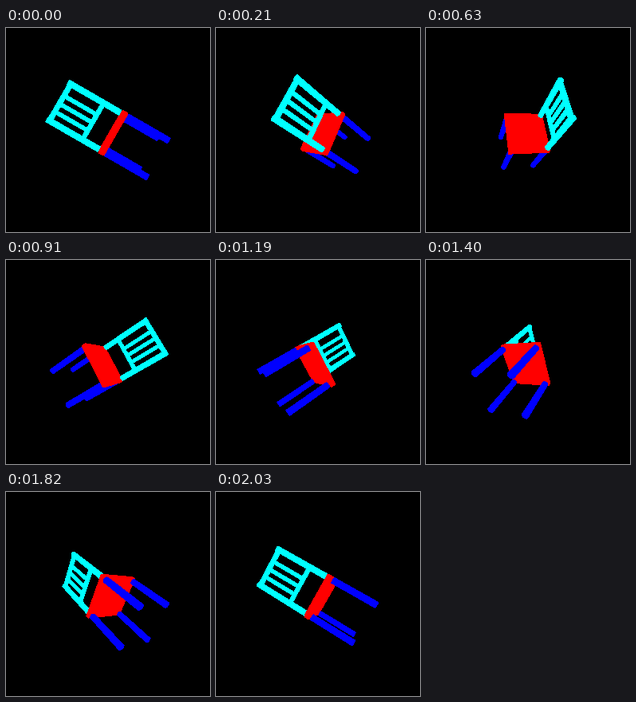
An HTML page with a canvas for the animation above (2100 ms loop, 256 by 256 pixels).

```html
<!DOCTYPE html>
<html lang="en">
<head>
<meta charset="utf-8">
<title>Turning chair</title>
<style>
  html, body { margin: 0; width: 100%; height: 100%; overflow: hidden; background: #000; }
  canvas { display: block; width: 100vw; height: 100vh; image-rendering: pixelated; }
</style>
</head>
<body>
<canvas id="stage" width="256" height="256"></canvas>
<script>
const SIZE = 256, MID = SIZE / 2;
const STEPS = 30, STEP_MS = 70;
const EYE = 240;               // camera distance
const TILT = Math.PI / 3;      // chair leans 60 degrees from the turning axis
const SIDES = 14;

const pack = (r, g, b) => (255 << 24 | b << 16 | g << 8 | r) >>> 0;
const BLACK = pack(0, 0, 0), RED = pack(255, 0, 0);
const BLUE = pack(0, 0, 255), CYAN = pack(0, 255, 255);

const ctx = document.getElementById('stage').getContext('2d');
const image = ctx.createImageData(SIZE, SIZE);
const pixels = new Uint32Array(image.data.buffer);
const depth = new Float32Array(SIZE * SIZE);

// Chair space: w across, u up, d towards the backrest.
const faces = [];

function prism(color, a, b) {
  faces.push({ color, points: a }, { color, points: b });
  a.forEach((p, i) => {
    const j = (i + 1) % a.length;
    faces.push({ color, points: [p, a[j], b[j], b[i]] });
  });
}

const ring = place => Array.from({ length: SIDES }, (_, i) => {
  const t = 2 * Math.PI * i / SIDES;
  return place(Math.cos(t), Math.sin(t));
});

function upright(color, w, d, u0, u1, r) {
  const end = u => ring((c, s) => [w + r * c, u, d + r * s]);
  prism(color, end(u0), end(u1));
}

function crossbar(color, u, d, half, r) {
  const end = w => ring((c, s) => [w, u + r * c, d + r * s]);
  prism(color, end(-half), end(half));
}

const HALF_W = 24.1, HALF_D = 22.4, TOP = 65.8;
const SEAT_TOP = -2.6, SEAT_BOTTOM = -10.9, BEVEL = 1.5, RAIL = 19.6;

// Seat slab with bevelled edges.
function seatOutline(u, inset) {
  const w = 28 - inset, d = 26.2 - inset;
  return [[-w, u, -d], [w, u, -d], [w, u, d], [-w, u, d]];
}
const layers = [
  seatOutline(SEAT_TOP, BEVEL), seatOutline(SEAT_TOP - BEVEL, 0),
  seatOutline(SEAT_BOTTOM + BEVEL, 0), seatOutline(SEAT_BOTTOM, BEVEL)
];
for (let i = 1; i < layers.length; i++) prism(RED, layers[i - 1], layers[i]);

for (const side of [-1, 1]) {
  const w = side * HALF_W;
  upright(CYAN, w, HALF_D, SEAT_TOP, TOP, 3.7);
  upright(BLUE, w, HALF_D, SEAT_BOTTOM, -TOP, 3.9);
  upright(BLUE, w, -HALF_D, SEAT_BOTTOM, -TOP, 3.9);
}
crossbar(CYAN, TOP - 3, HALF_D, HALF_W, 3.2);
crossbar(CYAN, RAIL, HALF_D, HALF_W, 2.9);
for (const k of [-1, 0, 1]) {
  upright(CYAN, HALF_W * (0.43 * k - 0.07), HALF_D, RAIL, TOP - 3, 2.6);
}

// Returns screen x, y and the perspective scale, which grows towards the viewer.
function project([w, u, d], angle) {
  const x = w * Math.cos(TILT) - u * Math.sin(TILT);
  const y = -w * Math.sin(TILT) - u * Math.cos(TILT);
  const c = Math.cos(angle), s = Math.sin(angle);
  const scale = EYE / (EYE - (d * c - x * s));
  return [MID + (x * c + d * s) * scale, MID + y * scale, scale];
}

const cross = (a, b, x, y) => (b[0] - a[0]) * (y - a[1]) - (b[1] - a[1]) * (x - a[0]);

function triangle(a, b, c, color) {
  const area = cross(a, b, c[0], c[1]);
  if (Math.abs(area) < 1e-6) return;
  const range = i => [
    Math.max(0, Math.floor(Math.min(a[i], b[i], c[i]))),
    Math.min(SIZE - 1, Math.ceil(Math.max(a[i], b[i], c[i])))
  ];
  const [x0, x1] = range(0), [y0, y1] = range(1);
  for (let y = y0; y <= y1; y++) {
    for (let x = x0; x <= x1; x++) {
      const px = x + 0.5, py = y + 0.5;
      const p = cross(b, c, px, py) / area;
      const q = cross(c, a, px, py) / area;
      const r = 1 - p - q;
      if (p < 0 || q < 0 || r < 0) continue;
      const near = p * a[2] + q * b[2] + r * c[2];
      const at = y * SIZE + x;
      if (near > depth[at]) {
        depth[at] = near;
        pixels[at] = color;
      }
    }
  }
}

function draw(step) {
  const angle = 2 * Math.PI * step / STEPS;
  pixels.fill(BLACK);
  depth.fill(0);
  for (const { color, points } of faces) {
    const p = points.map(v => project(v, angle));
    for (let i = 2; i < p.length; i++) triangle(p[0], p[i - 1], p[i], color);
  }
  ctx.putImageData(image, 0, 0);
}

let shown = -1;
function tick() {
  const step = Math.floor(performance.now() / STEP_MS) % STEPS;
  if (step !== shown) draw(shown = step);
  requestAnimationFrame(tick);
}
tick();
</script>
</body>
</html>
```
